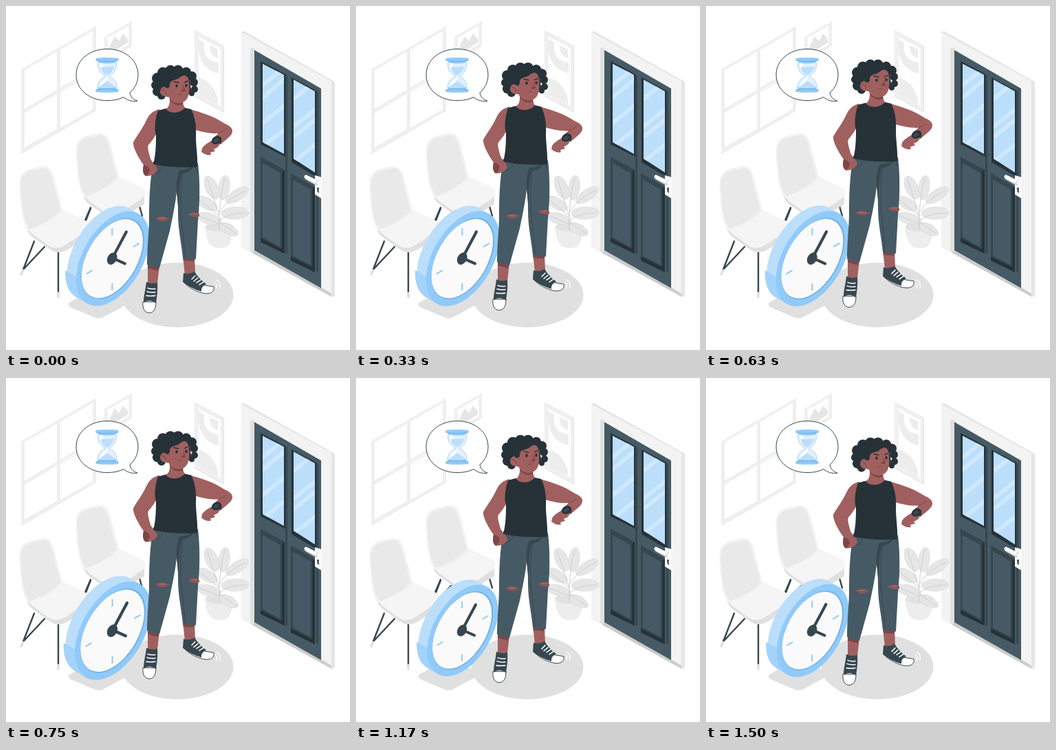
Recreate the animation shown at these times as an HTML page. Size 500 by 500 pixels, loop 1540 ms.

```html
<!DOCTYPE html>
<html lang="en">
<head>
<meta charset="utf-8">
<title>Waiting room</title>
<style>
html, body { margin: 0; height: 100%; overflow: hidden; background: #fff; }
svg { display: block; width: 100vw; height: 100vh; }
.line { fill: none; stroke-linecap: round; stroke-linejoin: round; }
</style>
</head>
<body>
<svg viewBox="0 0 500 500">
  <defs>
    <clipPath id="panes"><path d="M373 84 404 100V215L373 198ZM418 107 449 124V242L418 222Z"/></clipPath>
    <g id="chair">
      <path class="line" stroke="#37474f" stroke-width="2.4" d="M41 342 25 383M56 350 26 382M76 356V417"/>
      <path class="line" stroke="#dcdcdc" stroke-width="3" d="M25 384 22 390M76 417V423"/>
      <path fill="#e0e0e0" d="M30 320C31 330 36 334 43 339L66 355C73 360 82 358 88 355L119 336V318Z"/>
      <path fill="#f5f5f5" d="M32 324C50 318 72 308 80 295L116 312C123 316 122 323 115 328L90 345C80 352 72 354 63 349L38 331Z"/>
      <path fill="#f2f2f2" d="M20 268C18 246 24 241 34 237L52 233C63 231 68 241 70 250L82 297C72 313 50 320 33 327C26 318 22 305 20 268Z"/>
      <path fill="#e9e9e9" d="M22 270C20 250 25 244 35 240L53 236C61 234 65 243 67 252L79 297C68 311 50 318 35 324C28 316 24 304 22 270Z"/>
    </g>
  </defs>

  <!-- window and pictures -->
  <g class="line" stroke="#f0f0f0" stroke-width="4" style="stroke-linejoin:miter">
    <path d="M24 93 128 33V151L24 211ZM76 63V181M24 153 128 92"/>
    <path stroke="#e6e6e6" stroke-width="1" d="M26 95V207L74 180M78 64V177M26 155 74 127M79 125 127 97M130 30V152L23 214"/>
    <path stroke-width="3.5" d="M144.500 46 180 25.500V57L144.500 78Z"/>
    <path stroke="#e3e3e3" stroke-width="1" d="M182 22V58L168 66M147 48V64"/>
    <path stroke-width="4.500" fill="#fff" d="M276 40 314 60V151L276 130Z"/>
    <path stroke="#e4e4e4" stroke-width="1" d="M274 36 316.500 58V154L274 131M279 46V128L311 146"/>
  </g>
  <path fill="#e6e6e6" d="M149 62 158 44 164 51 170 40 177 48V53L160 64Z"/>
  <path fill="#ededed" d="M280 49 288 53C286 71 293 80 309 82V98C290 94 277 78 280 49ZM296 57 308 63V76C299 73 296 67 296 57ZM280 104C293 108 303 116 308 136V143L280 128Z"/>

  <!-- door -->
  <path fill="#e6e6e6" d="M342 37H347L478 110V422L473 423 342 350Z"/>
  <path fill="#f3f3f3" d="M342 38 473 109V421L458 413V120L357 62V358L342 350Z"/>
  <path fill="#e0e0e0" d="M355 61H361V356L355 357Z"/>
  <path fill="#ccc" d="M361 355 458 409 473 418V422L458 414 358 359Z"/>
  <path fill="#455a64" d="M361 64 458 120V410L361 355Z"/>
  <path fill="#263238" d="M370 80 406 99V219L370 201ZM415 104 451 123V248L415 227Z"/>
  <path fill="#bbdefb" d="M373 84 404 100V215L373 198ZM418 107 449 124V242L418 222Z"/>
  <path class="line" clip-path="url(#panes)" stroke="#cfe8fc" stroke-width="6" d="M366 121 409 86M366 139 409 103M366 176 409 141M366 210 409 176M412 140 455 105M412 180 455 146M412 195 455 161M412 231 455 197"/>
  <path fill="#37474f" d="M406 99 409 101V360H406ZM451 123 454 125V388L451 385ZM370 219 405 238V360L370 343ZM414 243 449 263V387L414 370Z"/>
  <path fill="#263238" d="M370 343V337L400 353V242L405 238V360ZM414 370V364L444 379V266L449 263V387Z"/>
  <path fill="#455a64" d="M373 227 400 242V351L373 336ZM417 251 444 266V377L417 363Z"/>
  <path class="line" stroke="#37474f" stroke-width="2.500" d="M373 227 400 242V351M417 251 444 266V377"/>
  <path fill="#fafafa" d="M449 246 459 249V280L449 274Z"/>
  <path class="line" stroke="#d5d5d5" stroke-width="5" d="M437 250 451 258"/>
  <path class="line" stroke="#fff" stroke-width="5" d="M436 248 452 256"/>
  <path class="line" stroke="#bbb" d="M450 258 454 253"/>
  <path fill="#37474f" d="M452 264H455L454.500 267 455 272 452.500 270Z"/>

  <!-- thought bubble -->
  <path fill="#fff" stroke="#37474f" d="M180 126C188 119 192 110 192 100C192 78 172 62.500 147 62.500S102 78 102 100 122 137.500 147 137.500C156 137.500 164 136 171 132.500C176 137 184 139.500 191 138C185 136 181 132 180 126Z"/>
  <g>
    <path fill="#e3f1fe" d="M134 81H160C162 92 157 98 150 102C157 106 162 110 161 121H133C132 110 138 106 145 102C137 98 132 92 134 81Z"/>
    <path fill="#fff" d="M137 83C136 91 140 96 146 100L147 104C141 107 137 111 137 118L141 119C141 110 149 108 148 102C142 98 140 91 141 83Z"/>
    <path fill="#bbdefb" d="M138 89 157 88C156 94 152 98 147 101C142 98 139 95 138 89ZM135 120C139 113 144 112 147 109C151 112 157 114 160 120Z"/>
    <path class="line" stroke="#a9d4fa" d="M134 81C132 92 137 98 145 102C138 106 132 110 133 121M160 81C162 92 157 98 150 102C157 106 162 110 161 121"/>
    <path fill="#90caf9" d="M130.500 76C133 74.500 161 74.500 163.500 76V79L160 80V82C151 84 143 84 134 82V80L130.500 79ZM134 118C143 120 151 120 160 118V121L163.500 122V125C160 126 134 126 130.500 125V122L134 121Z"/>
    <path class="line" stroke="#6aaee5" d="M131 79C139 81 155 81 163 79M131 122C139 120 155 120 163 122"/>
  </g>

  <!-- chairs, shadows, plant -->
  <path class="line" stroke="#37474f" stroke-width="2.400" d="M123 293 114 314M194 291 198 305"/>
  <use href="#chair" id="backChair"/>
  <use href="#chair"/>
  <ellipse cx="249" cy="420" rx="81.500" ry="47" fill="#e0e0e0"/>
  <path class="line" stroke="#fff" stroke-width="1.300" d="M303 402Q308 404 306 410M306 398Q313 402 311 410"/>
  <path fill="#e0e0e0" d="M92 431 128 411 186 428 142 452Q135 456 127 452L94 438Q89 435 92 431Z"/>
  <g>
    <path fill="#ededed" d="M289 321 331 318C330 333 327 345 321 350Q311 354 301 350C294 346 290 335 289 321Z"/>
    <ellipse cx="310" cy="321" rx="20" ry="7" fill="#e2e2e2"/>
    <g fill="#e6e6e6" stroke="#dadada" stroke-width=".6">
      <ellipse cx="317" cy="264" rx="8" ry="18" transform="rotate(8 317 264)"/>
      <ellipse cx="299" cy="264" rx="9" ry="18" transform="rotate(-24 299 264)"/>
      <ellipse cx="336" cy="275" rx="8" ry="19" transform="rotate(57 336 275)"/>
      <ellipse cx="292" cy="287" rx="8" ry="17" transform="rotate(-60 292 287)"/>
      <ellipse cx="333" cy="301" rx="9" ry="20" transform="rotate(88 333 301)"/>
      <ellipse cx="295" cy="309" rx="8" ry="18" transform="rotate(-75 295 309)"/>
      <ellipse cx="324" cy="325" rx="7" ry="15" transform="rotate(-63 324 325)"/>
    </g>
    <path class="line" stroke="#cfcfcf" d="M310 325C309 300 312 270 318 250M310 306 293 252M310 300Q322 280 348 268M310 305 280 281M310 312Q325 300 349 301M310 317 281 305M310 314 335 331"/>
  </g>

  <g id="clock">
    <g transform="matrix(.866 -.5 0 1 155 367)">
      <path fill="#bbdefb" d="M42 -42 24.500 -59.500A59.500 59.500 0 0 0 -59.500 24.500L-42 42Z"/>
      <path fill="#a3d3fb" d="M-77 -22A59.500 59.500 0 0 0 -59.500 24.500L-42 42-59 -4Z"/>
      <circle r="59.500" fill="#90caf9"/>
      <circle r="51" fill="#74b0e4"/>
      <circle cx="-1" cy="-.5" r="49.700" fill="#fafafa"/>
      <path stroke="#90caf9" stroke-width="2.200" d="M-1 -43V-33M-1 34V44M33 0H43M-43 0H-33"/>
    </g>
    <path class="line" stroke="#37474f" stroke-width="4" d="M154 367 174 329.500M154 366 172 374"/>
    <ellipse cx="154" cy="367" rx="6.500" ry="9" fill="#37474f" transform="rotate(30 154 367)"/>
  </g>

  <g id="person">
    <!-- ankles and shoes -->
    <path fill="#a0605f" d="M206 374 223 377 220 404H206ZM257 363H274L275 389 260 391Z"/>
    <path fill="#7d4545" d="M206 377 222 381 221 385 206 381ZM257 367 274 367V371L258 370Z"/>
    <path fill="#fff" stroke="#37474f" d="M199 430C198 440 202 446 208 446C215 446 218 440 218 430ZM258 401C265 409 279 417 291 418C300 418 303 414 302 408Z"/>
    <path fill="#37474f" d="M204 401Q212 405 220 402C221 413 219 425 218 432Q209 425 200 431C200 421 203 412 204 401ZM258 388Q266 391 274 386C279 394 285 400 291 404Q283 408 284 415C274 412 264 407 257 401Z"/>
    <path class="line" stroke="#fff" stroke-width="1.500" d="M206 410Q211 412 217 411M205 415Q210 417 217 416M204 421Q210 422 217 421M270 397 275 392M273 400 279 395M277 402 283 398M281 405 287 401"/>

    <!-- trousers -->
    <path fill="#455a64" d="M214 226 279 228C282 252 282 285 279 312L276 368Q266 369 257 366C255 345 250 325 250 302C250 290 250 282 248 270C246 290 242 307 238 327L223 381Q213 380 205 376C205 350 208 328 208 310C208 282 209 255 214 226Z"/>
    <path fill="#37474f" d="M248 270C247 258 249 246 252 239Q266 238 273 232C268 244 258 241 255 246C252 253 251 270 251 300Z"/>
    <path class="line" stroke="#37474f" d="M214 243Q225 243 228 234M256 246C253 270 253 295 255 312S259 345 260 366M276 234Q276 240 279 241"/>
    <path fill="#a0605f" d="M217 309Q226 304 238 309Q227 316 217 309ZM264 303Q274 298 281 302V306Q271 307 264 303Z"/>
    <path class="line" stroke="#7d4545" d="M218 309Q227 313 236 309M265 303Q273 305 280 304"/>

    <!-- arms -->
    <path fill="#a0605f" d="M223 150C212 153 208 158 204 166C198 179 190 189 185 198C184 205 192 220 200 231C198 238 199 245 203 247C210 248 219 243 220 238C219 232 213 228 210 222C208 214 205 206 207 202C213 195 218 188 220 182Z"/>
    <path fill="#7d4545" d="M200 231Q208 232 209 239Q207 245 203 247C198 242 199 237 200 231Z"/>
    <path fill="#a0605f" d="M268 150C284 155 302 160 318 171C328 175 331 180 328 186C324 192 317 196 312 201L301 193C304 189 307 187 309 185C297 186 285 183 275 180Z"/>
    <path class="line" stroke="#7d4545" d="M309 185Q316 183 320 179"/>
    <path fill="#a0605f" d="M300 195C293 199 287 203 285 207L284 212C288 215 293 218 298 216L297 213 304 211 302 208C308 206 310 203 311 200Z"/>
    <path fill="#37474f" d="M303 190 314 196 312 201 300 195Z"/>
    <ellipse cx="306" cy="195" rx="7.500" ry="5.500" fill="#263238" transform="rotate(-25 306 195)"/>
    <ellipse cx="305.500" cy="195.500" rx="4.500" ry="3" fill="#37474f" transform="rotate(-25 305 195)"/>

    <!-- torso and head -->
    <path fill="#a0605f" d="M238 132 258 136Q256 144 261 149L269 153 250 163 223 153 233 149Q239 146 238 132Z"/>
    <path fill="#263238" d="M221 152 232 149C237 157 252 157 260 148L269 150C275 161 277 176 276 190C276 205 279 219 278 234Q243 236 214 230C218 215 218 200 218 188C215 178 217 163 221 152Z"/>
    <g id="hair" fill="#263238"></g>
    <path fill="#7d4545" d="M238 135Q246 140 257 140L257 143Q246 147 238 137Z"/>
    <path fill="#a0605f" d="M237 106C245 97 262 96 265 106C267 117 267 127 264 133C261 140 253 142 248 141C242 140 238 137 236 131C230 133 224 130 224 124C225 117 231 115 236 120Z"/>
    <path fill="#263238" d="M231 118C234 120 237 120 238 116C237 110 242 108 246 107C252 106 253 102 258 101C263 100 266 104 267 110L270 99 257 91 239 93 229 104Z"/>
    <path class="line" stroke="#7d4545" d="M227 122Q232 122 233 128M250 129Q253 127 256 129"/>
    <path fill="#7d4545" d="M257 114 261 123Q257 126 254 123L258 121Z"/>
    <path class="line" stroke="#263238" stroke-width="1.500" d="M244 110 251 111.500M259.500 111 264 109"/>
    <g fill="#263238"><ellipse cx="248" cy="116" rx="1.700" ry="2.400"/><ellipse cx="262" cy="115.500" rx="1.700" ry="2.400"/></g>
  </g>
</svg>
<script>
const $ = id => document.getElementById(id);
const LOOP = 1540, FRAMES = 37, PERIOD = 1500;

$('backChair').setAttribute('transform', 'translate(82 -48)');

// curls as x, y, radius
const curls = [[220, 105, 8], [228, 97, 8], [239, 94, 8], [250, 94, 8], [262, 96, 7], [270, 102, 7],
  [273, 111, 6], [274, 121, 5], [270, 127, 4], [217, 115, 6], [220, 124, 7], [226, 130, 6], [232, 112, 15]];
$('hair').innerHTML = curls.map(([x, y, r]) => `<circle cx="${x}" cy="${y}" r="${r}"/>`).join('')
  + '<path d="M236 94H264L270 126 262 130 234 132Z"/>';

// linear keyframes as [position, value]
function tween(keys, p) {
  const i = keys.findIndex(k => k[0] > p);
  const [a, b] = [keys[i - 1], keys[i]];
  return a[1] + (b[1] - a[1]) * (p - a[0]) / (b[0] - a[0]);
}
const floating = [[0, 0], [.5, -10], [1, 0]];
const heartbeat = [[0, 1], [.1, 1.1], [.3, 1], [.4, 1], [.5, 1.1], [.6, 1], [1, 1]];

function draw(now) {
  const time = Math.floor((now % LOOP) * FRAMES / LOOP) * LOOP / FRAMES;
  const p = (50 + time * .983) / PERIOD % 1;
  const scale = tween(heartbeat, p);
  $('person').setAttribute('transform', `translate(0 ${tween(floating, p) + .7})`);
  $('clock').setAttribute('transform', `translate(148 363) scale(${scale}) translate(-148 -363)`);
}
const start = performance.now();
function tick() {
  draw(performance.now() - start);
  requestAnimationFrame(tick);
}
tick();
</script>
</body>
</html>
```
